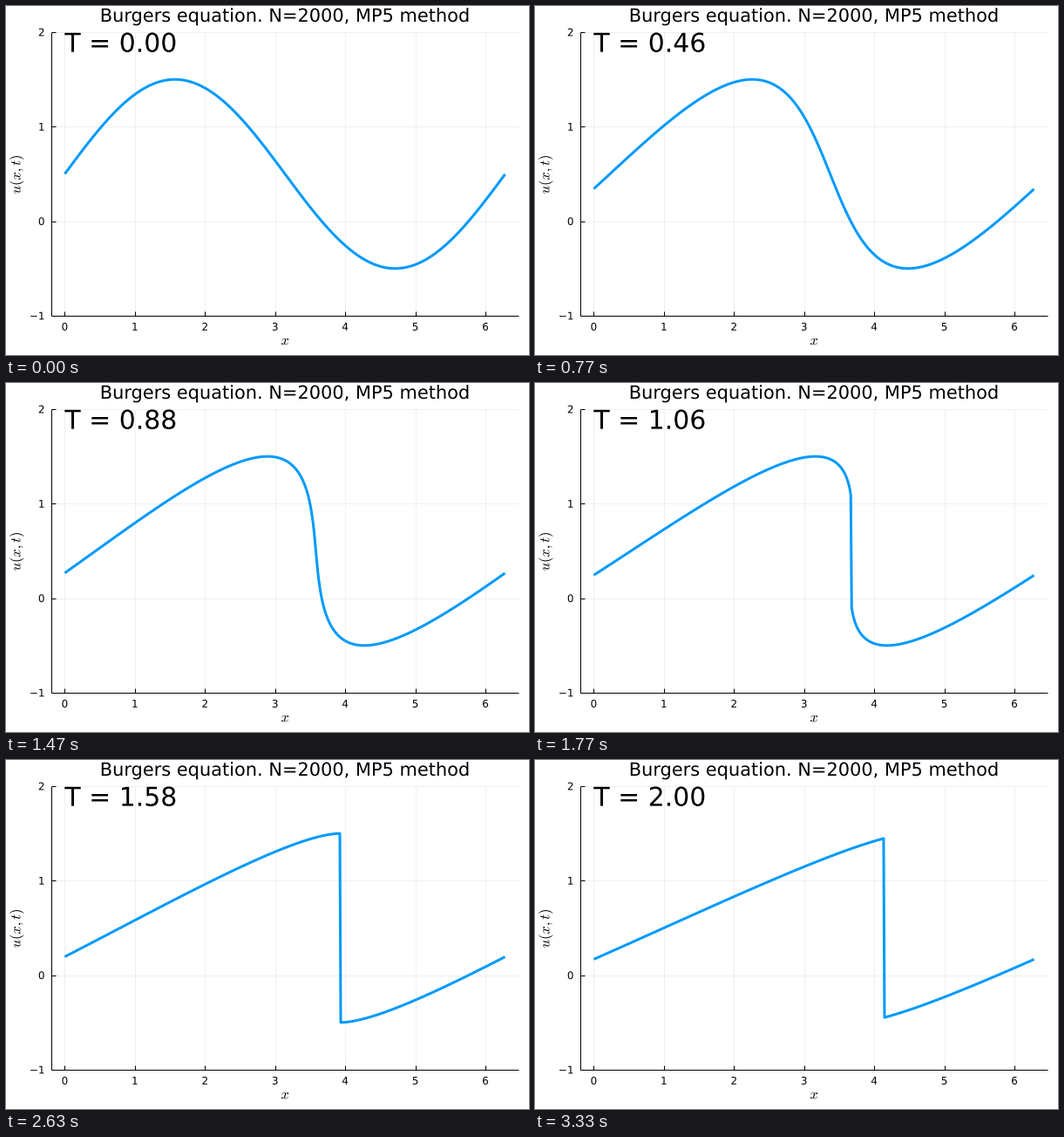
Write a matplotlib script that moves like this. It is 600x400 px and loops after 3.36 s.

```python
import matplotlib.pyplot as plt
import numpy as np
from matplotlib.animation import FuncAnimation
from matplotlib.patches import PathPatch
from matplotlib.textpath import TextPath
from matplotlib.transforms import Affine2D

W, H, DPI = 600, 400, 100
PT = 72 / DPI                      # points per pixel
LEFT, RIGHT, TOP, BOTTOM = 52.1, 588, 30, 355
MID_X, MID_Y = (LEFT + RIGHT) / 2, (TOP + BOTTOM) / 2
N = 2000
DX = 2 * np.pi / N
TICK_MS, LOOP_MS = 10, 3360

plt.rcParams.update({
    "font.family": "DejaVu Sans",
    "mathtext.fontset": "cm",
    "path.simplify": False,
})

fig = plt.figure(figsize=(W / DPI, H / DPI), dpi=DPI, facecolor="white")
ax = fig.add_axes([0, 0, 1, 1])
ax.set(xlim=(0, W), ylim=(H, 0))
ax.axis("off")


def px(x):
    return 67.4 + 80.43 * x


def py(u):
    return BOTTOM - (u + 1) * (BOTTOM - TOP) / 3


def line(xs, ys, color="black", z=2):
    ax.plot(xs, ys, color=color, lw=PT, solid_capstyle="butt", zorder=z)


def outline(x, y, text, size, center=False, angle=0):
    """Glyph outlines with the baseline at (x, y), in pixels."""
    path = TextPath((0, 0), text, size=size)
    shift = path.get_extents().x0 + path.get_extents().width / 2
    move = Affine2D().translate(-shift if center else 0, 0)
    return move.rotate_deg(angle).scale(1, -1).translate(x, y).transform_path(path)


def label(*args, **kw):
    patch = PathPatch(outline(*args, **kw), fc="black", lw=0, zorder=4)
    return ax.add_patch(patch)


def wave(t):
    """Inviscid Burgers solution for u0 = 1/2 + sin x, with its shock."""
    x = np.arange(N) * DX
    s = (x - 0.5 * t + np.pi) % (2 * np.pi) - np.pi
    a = np.linspace(0, np.arccos(-1 / max(t, 1)), 6000)
    u = 0.5 + np.sign(s) * np.sin(np.interp(np.abs(s), a + t * np.sin(a), a))
    keep = (np.pi - np.abs(s) > 1.5 * DX) | (t <= 1)
    return x[keep], u[keep]


# Grid, ticks and tick labels
DIGIT, MINUS = 7.6, 10
for i in range(7):
    x = px(i)
    line([x, x], [TOP, BOTTOM], "#f0f0f0", 1)
    line([x, x], [BOTTOM, BOTTOM - 5])
    label(x - DIGIT / 2, 371.8, str(i), 11.95)
for i in range(-1, 3):
    y = py(i)
    line([LEFT, RIGHT], [y, y], "#f0f0f0", 1)
    line([LEFT, LEFT + 5], [y, y])
    text = str(i).replace("-", "\u2212")
    label(44.5 - DIGIT - MINUS * (i < 0), y + 4.4, text, 11.95)
line([LEFT, RIGHT], [BOTTOM, BOTTOM])
line([LEFT, LEFT], [TOP, BOTTOM])

label(MID_X, 18, "Burgers equation. N=2000, MP5 method", 20.9, center=True)
label(MID_X, 388.3, "$x$", 16.4, center=True)
label(16.4, MID_Y + 1, "$u(x,t)$", 16.4, center=True, angle=90)

curve, = ax.plot([], [], color="#009afa", lw=3 * PT, zorder=3,
                 solid_capstyle="butt", solid_joinstyle="round")
CLOCK = px(0), 52.6
clock = label(*CLOCK, "T = 0.00", 29.9)


def update(tick):
    step = int((tick + 0.5) * 0.3)     # 30 steps per second
    t = step * 0.02
    x, u = wave(t)
    curve.set_data(px(x), py(u))
    clock.set_path(outline(*CLOCK, f"T = {t:.2f}", 29.9))
    return curve, clock


anim = FuncAnimation(fig, update, frames=LOOP_MS // TICK_MS,
                     interval=TICK_MS, repeat=True, repeat_delay=0)
plt.show()
```
